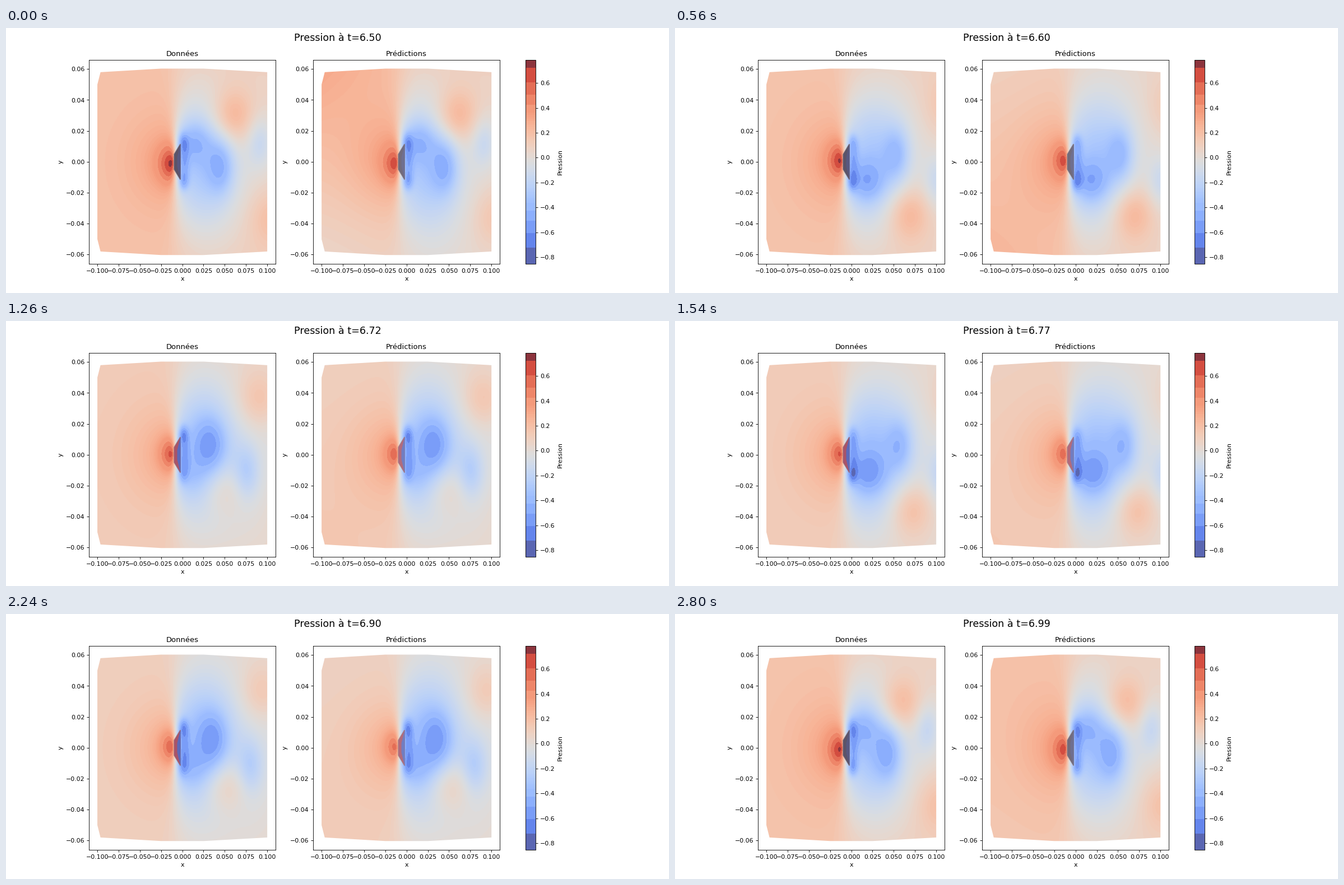
Recreate the animation shown at these times as a matplotlib script. Size 1183 px wide and 473 px high, loop 2.94 s.

```python
import numpy as np
import matplotlib.pyplot as plt
from matplotlib.animation import FuncAnimation
from matplotlib.colors import ListedColormap, to_rgb
from matplotlib.patches import Polygon

W, H, DPI = 1183, 473, 78.867
FRAMES, INTERVAL = 21, 140
VMIN, VMAX = -0.854, 0.787
T0, DT, PERIOD = 6.504, 0.0245, 0.1644

plt.rcParams["font.family"] = "DejaVu Sans"


def make_cmap(n=100, first=0.36, growth=1.19):
    """Coolwarm in n steps, with ever broader bands towards both ends."""
    value = VMIN + (np.arange(n) + 0.5) * (VMAX - VMIN) / n
    size = np.abs(value)
    band = np.floor(np.log(size / first) / np.log(growth))
    flat = np.sign(value) * first * growth ** (band + 0.25)
    shown = np.where(band >= 0, flat, value)
    colors = plt.get_cmap("coolwarm")((shown - VMIN) / (VMAX - VMIN))
    colors[(band >= 4) & (value > 0), :3] = to_rgb("#8c343d")
    colors[(band >= 4) & (value < 0), :3] = to_rgb("#5a66b2")
    return ListedColormap(colors)


x, y = np.meshgrid(np.linspace(-0.1, 0.1, 320), np.linspace(-0.0605, 0.0605, 340))
ay = np.abs(y)


def bump(cx, cy, sx, sy):
    return np.exp(-0.5 * (((x - cx) / sx) ** 2 + ((y - cy) / sy) ** 2))


def smooth(u):
    u = np.clip(u, 0, 1)
    return u * u * (3 - 2 * u)


def mean_level(i):
    return np.interp(i, [0, 4, 8, 16, 20], [0, -0.01, -0.055, -0.08, -0.01])


def vortex(age, side):
    """Low core, wide low halo and the high spot across the wake; age in periods."""
    cx = 0.025 * np.log1p(np.exp((age + 0.405) / 0.25))
    cy = min(0.013, 0.003 + 0.024 * abs(age))
    late = max(age, 0)
    young = smooth(-age / 0.4)
    low = 0.25 * smooth((age + 0.85) / 0.5) * np.exp(-0.8 * late)
    halo = 0.07 * smooth((age + 0.8) / 0.7)
    high = 0.25 * smooth((age + 0.38) / 0.35) * np.exp(-1.4 * late)
    high_y = min(0.036, 0.029 + 0.045 * age)
    return (high * bump(cx + 0.014, -side * high_y, 0.018, 0.0125)
            - low * bump(cx, side * cy, 0.0105 + 0.004 * young, 0.012 - 0.003 * young)
            - halo * bump(cx, side * 0.021, 0.028, 0.031))


def shed(phase):
    """Vortices leave alternately from the upper and lower tip every half period."""
    total = np.zeros_like(x)
    for k in range(-3, 9):
        age = phase - k / 2
        if -1 < age < 1.2:
            total += vortex(age, 1 if k % 2 else -1)
    return total


def upstream(level, phase, gain):
    cy = -0.0012 * np.cos(2 * np.pi * phase)
    r2 = ((x + 0.013) / 0.0125) ** 2 + ((y - cy) / 0.0100) ** 2
    broad = 0.14 * np.exp(-((x + 0.02) / 0.045) ** 2 - (y / 0.03) ** 2)
    return 0.185 + broad + gain * (0.47 + 1.2 * level) * np.exp(-r2 ** 0.75)


def downstream(phase):
    swing = np.sin(2 * np.pi * phase) * np.sign(y)
    strip = 0.25 * np.exp(-((x - 0.002) / 0.006) ** 2 - (y / 0.014) ** 4)
    tips = 0.2 * (1 + 0.5 * swing) * bump(0.001, 0, 0.004, 1) \
        * np.exp(-((ay - 0.0135) / 0.0055) ** 2)
    return 0.12 - 0.36 * bump(0.02, 0, 0.031, 0.03) - strip - tips + shed(phase)


def pressure(i, predicted):
    level = mean_level(i)
    phase = i * DT / PERIOD
    gate = 1 / (1 + np.exp(np.clip((x + 0.0095) / (0.001 + 0.1 * ay), -50, 50)))
    front = upstream(level, phase, 0.85 if predicted else 1)
    p = gate * front + (1 - gate) * downstream(phase) + level
    if predicted:
        # The predicted field leans up and down with the shedding, then settles
        lean = 0.13 * np.cos(2 * np.pi * phase) * np.exp(-0.6 * phase) * y / 0.06
        left = np.clip((0.01 - x) / 0.11, 0, 1)
        p += lean * left + 0.5 * np.minimum(lean, 0) * (1 - left)
    return p


def mirror(points):
    return points + [(px, -py) for px, py in reversed(points)]


OUTLINE = mirror([(-0.1, 0.05), (-0.0963, 0.058), (-0.025, 0.0603),
                  (0.025, 0.0603), (0.1, 0.058)])
BODY = mirror([(-0.0098, 0.005), (-0.0027, 0.0115), (-0.002, 0.0115)])
REAR = mirror([(-0.006, 0.003), (-0.0027, 0.0105), (-0.002, 0.0115)])


def shade(i, predicted, dull, vivid):
    """Body colour: dull at a high mean level, vivid at a low one."""
    g = smooth((mean_level(i) + 0.045) / 0.03)
    rgb = g * np.array(to_rgb(dull)) + (1 - g) * np.array(to_rgb(vivid))
    return tuple(rgb + 0.16 * predicted * (0.9 - rgb))


fig, axes = plt.subplots(1, 2, figsize=((W + 0.01) / DPI, (H + 0.01) / DPI), dpi=DPI)
cmap = make_cmap()
panels = []
for ax, name in zip(axes, ("Données", "Prédictions")):
    img = ax.imshow(np.zeros_like(x), cmap=cmap, vmin=VMIN, vmax=VMAX, origin="lower",
                    extent=(-0.1, 0.1, -0.0605, 0.0605), aspect="auto",
                    interpolation="bilinear")
    img.set_clip_path(Polygon(OUTLINE, transform=ax.transData))
    body = ax.add_patch(Polygon(BODY, ec="#998f94", lw=0.6))
    rear = ax.add_patch(Polygon(REAR, ec="none"))
    ax.set(xlim=(-0.11, 0.11), ylim=(-0.066, 0.066), title=name, xlabel="x", ylabel="y",
           xticks=np.arange(-4, 5) * 0.025, yticks=np.arange(-3, 4) * 0.02)
    ax.xaxis.set_major_formatter(lambda v, _: f"{v:.3f}".replace("-", "\u2212"))
    panels.append((img, body, rear))

fig.colorbar(panels[0][0], ax=list(axes), label="Pression",
             ticks=np.arange(-4, 4) * 0.2)
title = fig.suptitle("", fontsize=16)


def draw(i):
    title.set_text(f"Pression à t={T0 + DT * i:.2f}")
    for predicted, (img, body, rear) in enumerate(panels):
        img.set_data(pressure(i, predicted))
        body.set_facecolor(shade(i, predicted, "#5c5468", "#a85468"))
        rear.set_facecolor(shade(i, predicted, "#585880", "#5c69b9"))
    return [title]


anim = FuncAnimation(fig, draw, frames=FRAMES, interval=INTERVAL,
                     init_func=lambda: draw(0), repeat=True, repeat_delay=0)
plt.show()
```
